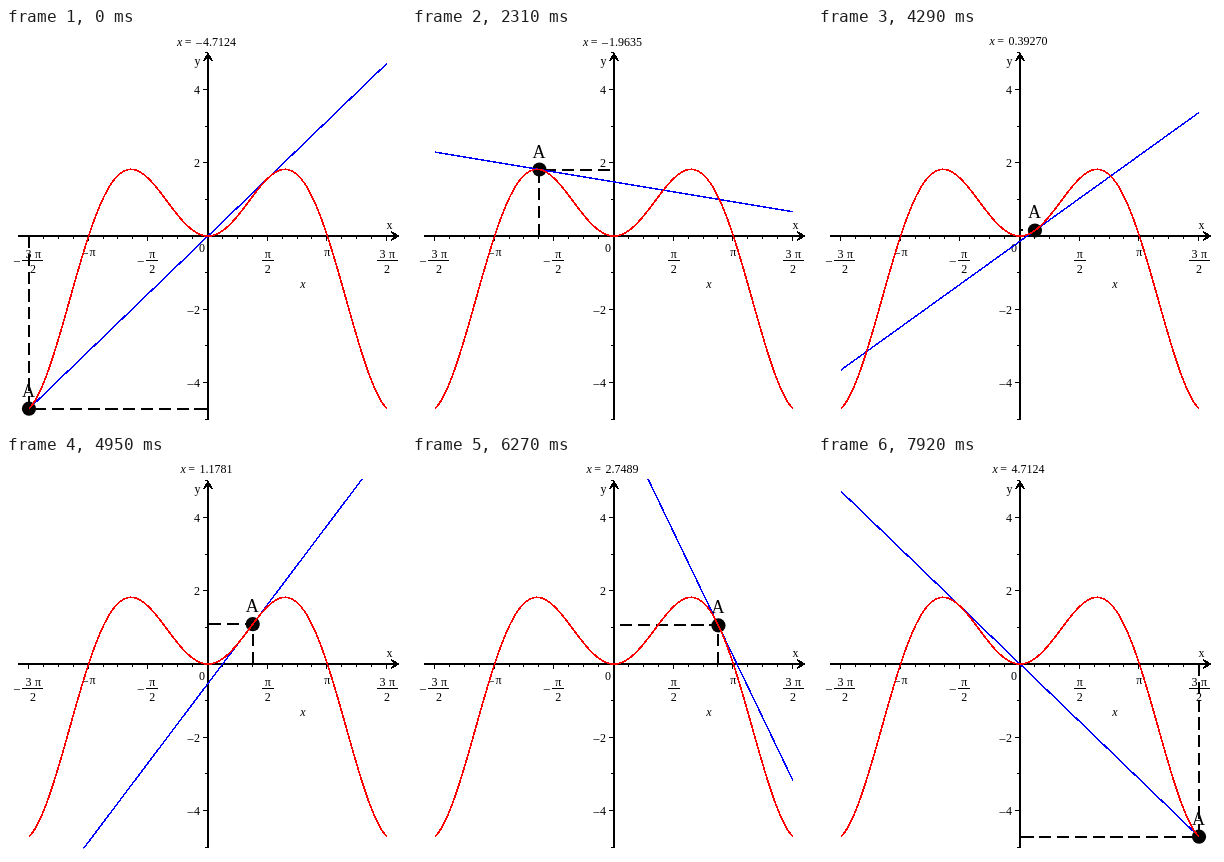
An HTML page that plays this animation: 400x400 px, repeating every 8.25 s.

```html
<!DOCTYPE html>
<html lang="en">
<head>
<meta charset="utf-8">
<title>Tangent to x sin x</title>
<style>
  html, body { margin: 0; width: 100%; height: 100%; overflow: hidden; background: #fff; }
  svg { display: block; width: 100%; height: 100%; }
  text { font: 12px "Liberation Serif", "Times New Roman", serif; fill: #000; }
  .it { font-style: italic; }
  .mid { text-anchor: middle; }
  .end { text-anchor: end; }
  #tag { font-size: 18px; }
  path { fill: none; stroke: #000; stroke-width: 2; shape-rendering: crispEdges; }
  path.thin { stroke-width: 1; }
  #guide { stroke-dasharray: 12.2 5.6; }
  #tangent { stroke: #00f; stroke-width: 1.5; }
  #curve { stroke: #f00; stroke-width: 1.7; }
</style>
</head>
<body>
<svg viewBox="0 0 400 400">
  <defs><clipPath id="plot"><rect x="22.5" y="23" width="359" height="369.5"/></clipPath></defs>
  <g id="axes"></g>
  <path id="guide"/>
  <circle id="dot" r="7.1"/>
  <g clip-path="url(#plot)"><path id="tangent"/></g>
  <path id="curve"/>
  <text id="tag" class="mid">A</text>
  <text id="title" class="mid" x="200.5"><tspan class="it">x</tspan><tspan dx="2.5">=</tspan><tspan id="value" dx="4.5"></tspan></text>
</svg>
<script>
const STEP = 330, COUNT = 25, END = 1.5 * Math.PI;
const OX = 202, OY = 208, UX = 37.99, UY = 36.65;
const MINUS = "–";
const $ = id => document.getElementById(id);
const px = x => OX + x * UX;
const py = y => OY - y * UY;
const at = (x, y) => `${px(x).toFixed(2)},${py(y).toFixed(2)}`;
const f = x => x * Math.sin(x);
const slope = x => Math.sin(x) + x * Math.cos(x);

function add(name, attrs, text = "") {
  const el = document.createElementNS("http://www.w3.org/2000/svg", name);
  for (const key in attrs) el.setAttribute(key, attrs[key]);
  el.textContent = text;
  $("axes").append(el);
}
const label = (x, y, text, cls = "mid") => add("text", { x, y, class: cls }, text);
const line = (d, cls = "") => add("path", { d, class: cls });

// Stacked fraction centred on x, with an optional leading minus
function fraction(x, top, width, negative) {
  const mid = x + (negative ? 4 : 0);
  if (negative) label(mid - width / 2 - 5.5, 236, MINUS);
  if (top.length > 1) {
    label(mid - 4.5, 230, top[0]);
    label(mid + 5, 230, top[1]);
  } else label(mid, 230, top);
  line(`M${mid - width / 2},232.5h${width}`, "thin");
  label(mid, 245, "2");
}

function drawAxes() {
  line(`M12,${OY}H392M${OX},26V392`);
  line(`M385,${OY - 4}L392,${OY}L385,${OY + 4}M198,33L${OX},26L206,33`);
  for (let i = -12; i <= 12; i++)
    line(`M${Math.round(px(i * Math.PI / 8)) - 0.5},${OY}v${i % 4 ? 3 : 5}`, "thin");
  for (let y = -5; y <= 5; y++)
    line(`M${OX},${Math.floor(py(y)) + 0.5}h${y % 2 ? -3 : -5}`, "thin");

  for (const y of [-4, -2, 2, 4]) {
    const base = Math.round(py(y) + 4.5);
    label(194, base, Math.abs(y), "end");
    if (y < 0) label(184.5, base, MINUS);
  }
  label(196, 224, "0");
  label(191.5, 37, "y");
  label(383.5, 201, "x");
  label(297, 260, "x", "mid it");
  fraction(px(-END), "3π", 21, true);
  fraction(px(-Math.PI / 2), "π", 12, true);
  fraction(px(Math.PI / 2), "π", 12, false);
  fraction(px(END), "3π", 21, false);
  label(79, 228, MINUS);
  label(86.5, 228, "π");
  label(px(Math.PI), 228, "π");
}

function drawCurve() {
  const pts = [];
  for (let i = 0; i <= 120; i++) {
    const x = END * (i / 60 - 1);
    pts.push(at(x, f(x)));
  }
  $("curve").setAttribute("d", "M" + pts.join("L"));
}

function pose(i) {
  const x = (i - 12) * Math.PI / 8, y = f(x), k = slope(x);
  const size = Math.abs(x);
  const digits = i === 12 ? "0." : size.toFixed(size < 1 ? 5 : 4);
  $("guide").setAttribute("d", `M${at(x, 0)}L${at(x, y)}L${at(0, y)}`);
  $("dot").setAttribute("cx", px(x));
  $("dot").setAttribute("cy", py(y));
  $("tag").setAttribute("x", px(x) - 0.5);
  $("tag").setAttribute("y", py(y) - 12);
  $("tangent").setAttribute("d", `M${at(-END, y + k * (-END - x))}L${at(END, y + k * (END - x))}`);
  $("title").setAttribute("y", i < 12 ? 18 : 17);
  $("value").textContent = i < 12 ? MINUS + "\u200a" + digits : digits;
}

let shown = -1;
function tick(now) {
  const i = Math.floor(now / STEP) % COUNT;
  if (i !== shown) pose(shown = i);
  requestAnimationFrame(tick);
}

drawAxes();
drawCurve();
pose(0);
requestAnimationFrame(tick);
</script>
</body>
</html>
```
